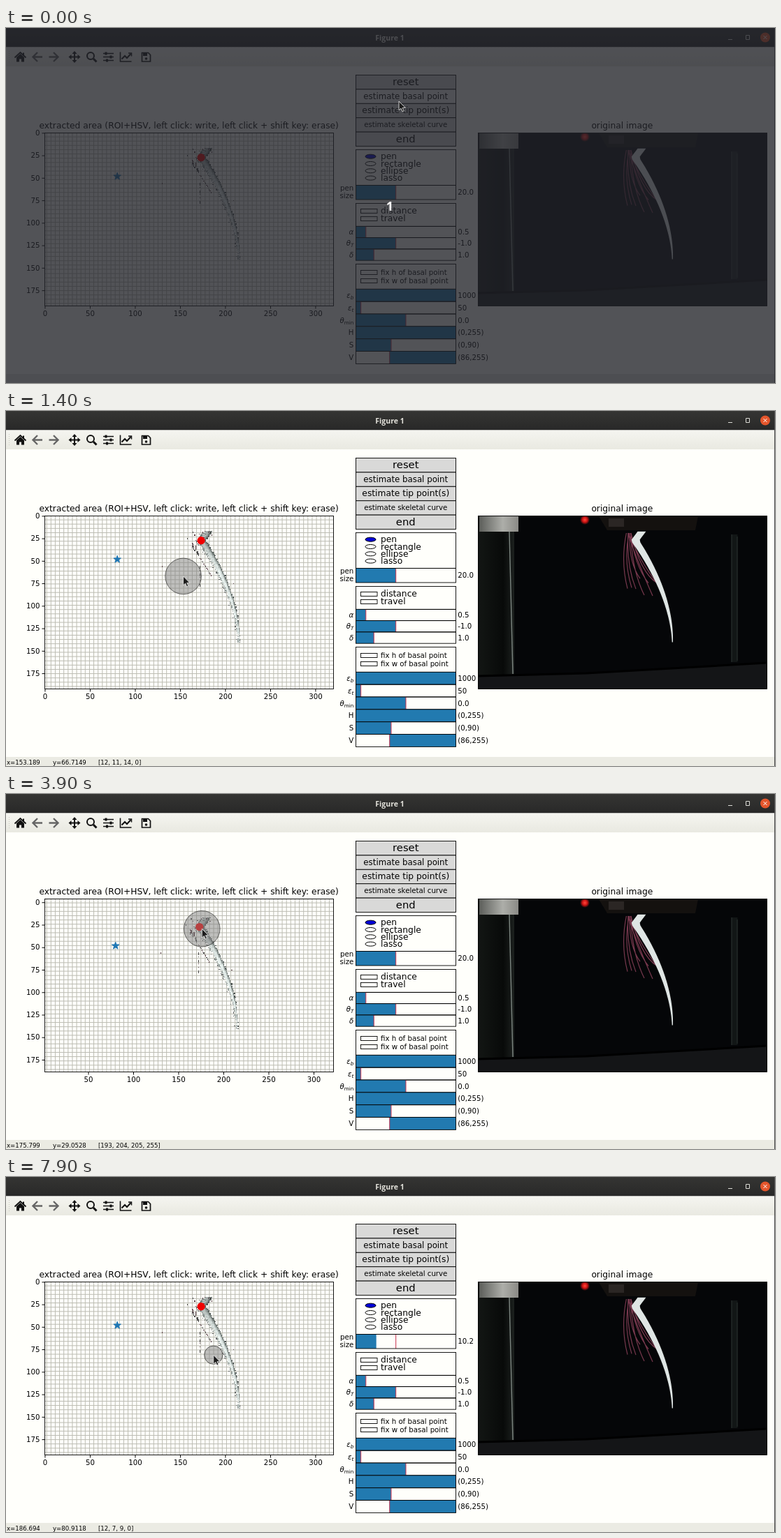
Recreate the animation shown at these times as an HTML page. Size 1100 by 509 pixels, loop 8 s.

```html
<!DOCTYPE html>
<html lang="en">
<head>
<meta charset="utf-8">
<title>Figure 1</title>
<style>
  html, body { margin: 0; width: 100%; height: 100%; overflow: hidden; background: #fffffb; }
  svg { display: block; width: 100%; height: 100%; }
  text { font-family: "DejaVu Sans", sans-serif; font-size: 10.2px; white-space: pre; }
  .big { font-size: 14.8px; }
  .mid { font-size: 12.25px; }
  .snug { font-size: 11.8px; }
  .status { font-size: 8.6px; }
  .bold { font-family: "Open Sans", sans-serif; font-weight: 700; }
  .caption { font-size: 10.5px; fill: #e2e1da; }
  .count { font-size: 18px; fill: #fff; }
  .math { font-style: italic; }
  .sub { font-size: 7.2px; }
  .box { fill: none; stroke: #000; stroke-width: .9; }
  .cells { shape-rendering: crispEdges; }
</style>
</head>
<body>
<svg viewBox="0 0 1100 509">
  <defs>
    <linearGradient id="bar" x2="0" y2="1"><stop stop-color="#353533"/><stop offset="1" stop-color="#282828"/></linearGradient>
    <linearGradient id="tools" x2="0" y2="1"><stop stop-color="#f5f5f0"/><stop offset="1" stop-color="#e9e9e1"/></linearGradient>
    <linearGradient id="pillar"><stop stop-color="#131614"/><stop offset=".7" stop-color="#080a09"/><stop offset="1" stop-color="#1c201e"/></linearGradient>
    <linearGradient id="lamp"><stop stop-color="#5c5e5a"/><stop offset=".6" stop-color="#adaea9"/><stop offset="1" stop-color="#8b8a86"/></linearGradient>
    <radialGradient id="glow"><stop stop-color="#ff4a3c"/><stop offset=".5" stop-color="#d01414"/><stop offset="1" stop-color="#d01414" stop-opacity="0"/></radialGradient>
    <clipPath id="plotClip"><rect x="55.5" y="150.5" width="413" height="248"/></clipPath>
    <clipPath id="photoClip"><rect x="675.5" y="150.5" width="413" height="248"/></clipPath>
  </defs>

  <rect width="1100" height="509" fill="#fffffb"/>
  <rect width="1100" height="27.5" fill="url(#bar)"/>
  <text class="bold caption" x="549" y="17.8" text-anchor="middle">Figure 1</text>
  <path d="M1033 16.5h6M1058.5 10.5h5v6h-5z" fill="none" stroke="#dcdcd6"/>
  <circle cx="1086" cy="13.5" r="7" fill="#e5562c"/>
  <path d="M1083.5 11l5 5m0-5l-5 5" stroke="#fff"/>

  <rect y="27.5" width="1100" height="27.5" fill="url(#tools)"/>
  <path d="M4.5 33v18" stroke="#c9c9c0" stroke-dasharray="1 2"/>
  <g fill="none" stroke="#111" stroke-width="2">
    <path d="M12.5 42.5L20.5 35l8 7.5" stroke-width="1.8"/>
    <path d="M15 42l5.500-5 5.500 5v6.500h-4v-4h-3v4h-4zM24 35.500h2v4h-2z" fill="#111" stroke="none"/>
    <path d="M52 41.5H39M45 35l-6.500 6.500 6.500 6.500M61.500 41.5h13M68 35l6.500 6.500-6.500 6.500" stroke="#666" stroke-width="2.4"/>
    <path d="M98 35v13M91.5 41.5h13"/>
    <path d="M98 33l3.500 4h-7zM98 50l3.500-4h-7zM89.500 41.500l4-3.500v7zM106.500 41.500l-4-3.500v7z" fill="#111" stroke="none"/>
    <circle cx="121" cy="40" r="5"/><path d="M125 44l4.500 4.500" stroke-width="3"/>
    <path d="M139 36.5h15M139 41.5h15M139 46.5h15" stroke-width="1.5"/>
    <path d="M143 34.5v4M150 39.5v4M144.5 44.5v4" stroke-width="3"/>
    <path d="M163.5 34.5v13.500h16" stroke-width="1.6"/><path d="M165.5 44.5l4.500-4.500 3 3 5.500-6"/>
    <path d="M175 36h4.500v4.500" stroke-width="1.5"/>
    <path d="M194.5 35.5h9l3 3v9.500h-12z" stroke-width="1.7"/>
    <path d="M196 36h6v4h-6z" fill="#111" stroke="none"/><circle cx="200.5" cy="44" r="1.8" fill="#111" stroke="none"/>
  </g>

  <text class="mid" x="261.7" y="143.8" text-anchor="middle">extracted area (ROI+HSV, left click: write, left click + shift key: erase)</text>
  <text class="mid" x="881.3" y="143.8" text-anchor="middle">original image</text>

  <g clip-path="url(#plotClip)">
    <path id="hatch" stroke="#bcbcb3" fill="none"/>
    <g id="cells" class="cells"></g>
    <path id="star" fill="#1f77b4" stroke="#1f77b4"/>
    <circle id="basal" r="5.6" fill="#f00000"/>
    <circle id="pen" fill="#808080" fill-opacity=".5" stroke="#000" stroke-opacity=".55"/>
  </g>
  <g id="ticks"></g>
  <rect class="box" x="55.5" y="150.5" width="413" height="248"/>

  <g clip-path="url(#photoClip)">
    <rect x="675" y="150" width="415" height="249" fill="#050608"/>
    <rect x="675" y="172" width="52" height="208" fill="url(#pillar)"/>
    <rect x="677" y="151" width="56" height="22" fill="url(#lamp)"/>
    <path d="M720 173l5 204" stroke="#7d8681" stroke-width="1.4"/>
    <path d="M848 151h142l-4 20H860z" fill="#14110f"/>
    <path d="M862 154h22v12h-22z" fill="#2b2624"/>
    <circle cx="828" cy="156" r="7" fill="url(#glow)"/>
    <path d="M1042 177v183" stroke="#121616" stroke-width="9"/>
    <path d="M1038 177v183M1046 180v178" stroke="#2b3231"/>
    <path d="M675 381l155-5 260-15v40H675z" fill="#141517"/>
    <path d="M675 380l155-4 260-15" stroke="#000" stroke-width="3" fill="none"/>
    <path id="roots" fill="none" stroke="#77384d" stroke-width="1.2"/>
    <path id="stem" fill="#dfe5e4"/>
  </g>
  <rect class="box" x="675.5" y="150.5" width="413" height="248"/>

  <g id="panel"></g>
  <rect y="496" width="1100" height="13" fill="#ebebe3"/>
  <text class="status" id="sx" x="1" y="507.3"></text>
  <text class="status" id="sy" x="67" y="507.3"></text>
  <text class="status" id="sc" x="132" y="507.3"></text>
  <path d="M1099.5 0v509" stroke="#4b4b4b"/>

  <g id="veil">
    <rect width="1100" height="509" fill="#22232a" fill-opacity=".78"/>
    <text class="bold count" x="549" y="262" text-anchor="middle">1</text>
  </g>
  <path id="cursor" d="M0 0V13L3 10.3 5 14.8 7.2 13.8 5.2 9.5H9.3Z" fill="#1c1c1c" stroke="#f4f4f4" stroke-width=".8"/>
</svg>

<script>
const LOOP = 8000, STEP = 100;
const X0 = 55.3, Y0 = 150.2, UNIT = 1.29, COLS = 320, ROWS = 192;
const $ = id => document.getElementById(id);
const lerp = (a, b, u) => a + (b - a) * u;
const set = (id, attrs) => Object.entries(attrs).forEach(([k, v]) => $(id).setAttribute(k, v));

let seed = 7;
const rand = () => (seed = (seed * 16807) % 2147483647) / 2147483647;

// Left and right edge of the stem in an image row: a short hook, then a long bend
const HEAD = 17, KNEE = 27, TIP = 140;
function stemEdges(y) {
  const u = Math.max(0, (y - KNEE) / (TIP - KNEE));
  const mid = y < KNEE ? 173.5 + (KNEE - y) * .75 : 173.5 + 41.5 * (1 - (1 - u) ** 1.85);
  const half = 4.6 - 4.1 * u;
  return [mid - half, mid + half];
}

function drawCells() {
  let out = '';
  const cell = (x, y, fill, h = 1) =>
    out += `<rect x="${Math.floor(x) - .5}" y="${Math.floor(y) - .5}" width="1" height="${h}" fill="${fill}"/>`;
  const root = (x, y, h) => cell(x, y, rand() < .6 ? '#553a41' : '#4a4a4a', h);

  for (let y = HEAD; y <= TIP; y++) {
    const [l, r] = stemEdges(y);
    const base = 172 + Math.min(1, (y - HEAD) / 45) * 62;
    for (let x = Math.floor(l); x <= r; x++) {
      const t = (x - l) / (r - l);
      if (t < .12 && rand() < .4) continue;
      const shade = t < .12 ? .7 : 1 - .6 * Math.max(0, (t - .5) / .5) ** 1.4;
      const b = base * shade + rand() * 20 - 10;
      cell(x, y, `rgb(${b - 5},${b + 4},${b + 1})`);
    }
    if (rand() < .22) cell(r + 1, y, '#4c5251');
    if (rand() < .25) cell(l - 1 - rand(), y, '#606364');
  }
  for (let i = 0; i < 14; i++) root(164 + rand() * 22, HEAD + rand() * 8, 1);
  for (let i = 0; i < 10; i++) root(163 + i * .8, 28 + rand() * 8 + i, 1 + rand() * 4 | 0);
  for (let i = 0; i < 13; i++) root(172 + i, 47 + i * 1.6, 1);
  for (let y = 56; y < 78; y += 4) root(172, y, 1 + rand() * 3 | 0);
  [[130, 56], [158, 25], [209, 75]].forEach(([x, y]) => root(x, y, 1));
  $('cells').innerHTML = out;
}

function drawHatch() {
  const gap = 6.125;
  let d = '';
  for (let x = gap / 2; x < 469; x += gap) d += `M${x} 150V399`;
  for (let y = 55 + gap / 2; y < 399; y += gap) d += `M55 ${y}H469`;
  set('hatch', { d });
}

function drawPhoto() {
  const left = [], right = [];
  for (let y = HEAD; y <= TIP; y += 3) {
    const [l, r] = stemEdges(y).map(x => `${675.3 + (x + .5) * UNIT} ${Y0 + (y + .5) * UNIT}`);
    left.push(l);
    right.unshift(r);
  }
  set('stem', { d: 'M' + left.concat(right).join('L') + 'Z' });
  let d = '';
  for (let i = 0; i < 9; i++)
    d += `M${887 + rand() * 7} 175Q${879 + i * 4} ${215 + rand() * 16} ${889 + i * 6} ${240 + rand() * 34}`;
  set('roots', { d });
}

function drawStar() {
  const points = Array.from({ length: 10 }, (_, i) => {
    const a = i * Math.PI / 5, r = i % 2 ? 2.2 : 5.5;
    return `${r * Math.sin(a)} ${-r * Math.cos(a)}`;
  });
  set('star', { d: 'M' + points.join('L') + 'Z' });
}

const BUTTON_TOP = 67.5, BUTTON_H = 20.4;
function drawPanel() {
  let out = '';
  const left = 500.5, width = 143;
  const box = (y, h, extra = '') =>
    out += `<rect class="box" x="${left}" y="${y}" width="${width}" height="${h}" ${extra}/>`;
  const text = (s, x, y, cls = '', anchor = 'start', id = '') =>
    out += `<text id="${id}" class="${cls}" x="${x}" y="${y}" text-anchor="${anchor}">${s}</text>`;
  const sub = (s, slant = 'italic') => `<tspan class="sub" dy="2" font-style="${slant}">${s}</tspan>`;

  const buttons = [['reset', 'big'], ['estimate basal point', 'snug'], ['estimate tip point(s)', 'mid'],
    ['estimate skeletal curve', ''], ['end', 'big']];
  buttons.forEach(([s, cls], i) => {
    const y = BUTTON_TOP + i * BUTTON_H;
    box(y, BUTTON_H, `id="b${i}"`);
    text(s, 571.8, y + BUTTON_H / 2 + (cls === 'big' ? 4.4 : 3.4), cls, 'middle');
  });

  box(174.5, 51);
  ['pen', 'rectangle', 'ellipse', 'lasso'].forEach((s, i) => {
    const y = 184.2 + i * 10.3;
    out += `<ellipse cx="521.5" cy="${y}" rx="7.5" ry="3" fill="${i ? 'none' : '#0000d8'}" stroke="#000"/>`;
    text(s, 536, y + 4, 'mid');
  });

  const checks = (y, h, labels, cls) => {
    box(y, h);
    labels.forEach((s, i) => {
      const cy = y + h / 3 + i * h / 3;
      out += `<rect class="box" x="507.5" y="${Math.round(cy) - 3.5}" width="23.5" height="6"/>`;
      text(s, 536, cy + 3.4, cls);
    });
  };
  checks(251.5, 33, ['distance', 'travel'], 'mid');
  checks(338.5, 36, ['fix h of basal point', 'fix w of basal point'], '');

  const sliders = (top, h, rows) => rows.forEach(([label, value, to, from = 0, id = ''], i) => {
    const y = top + i * h, base = y + h / 2 + 3.6;
    const mark = left + width * (from || to);
    out += `<rect id="${id}Fill" x="${left + width * from}" y="${y}" width="${width * (to - from)}" height="${h}" fill="#227ab0"/>
      <path d="M${mark} ${y}v${h}" stroke="#c8304c"/>`;
    box(y, h);
    text(label, 497.3, base, /[^A-Z]/.test(label) ? 'math' : '', 'end');
    text(value, 646.3, base, '', 'start', id + 'Text');
  });
  text('pen', 497.3, 232.7, '', 'end');
  text('size', 497.3, 244.2, '', 'end');
  sliders(225.5, 20.5, [['', '20.0', .4, 0, 'size']]);
  sliders(284.3, 16.3, [['α', '0.5', .1], ['θ' + sub('T'), '-1.0', .4], ['δ', '1.0', .18]]);
  sliders(374.3, 17.85, [['ε' + sub('b'), '1000', 1], ['ε' + sub('t'), '50', .05],
    ['θ' + sub('min', 'normal'), '0.0', .5], ['H', '(0,255)', 1],
    ['S', '(0,90)', 90 / 255], ['V', '(86,255)', 1, 86 / 255]]);
  $('panel').innerHTML = out;
}

// Scroll wheel notches; each one zooms by a factor of 1.5
const zoomIn = [1900, 2200, 2400, 3900], zoomOut = [2900, 3200, 3300, 3500];
const HOME = 5000, RESIZE = 7000;
function viewAt(t) {
  const passed = list => list.filter(s => s <= t).length;
  const z = 1.5 ** (passed(zoomIn) - passed(zoomOut));
  const drifted = t >= zoomOut[0] && t < HOME;
  const [fx, fy, left, top] = drifted ? [175.8, 29.05, 1.4, -4.3] : [176.3, 28.8, -.5, -.5];
  return { left: fx - (fx - left) / z, top: fy - (fy - top) / z, scale: UNIT * z };
}
const toX = (v, x) => X0 + (x - v.left) * v.scale;
const toY = (v, y) => Y0 + (y - v.top) * v.scale;
const onImage = (t, x, y) => [toX(viewAt(t), x), toY(viewAt(t), y)];

// Pointer moves: start, end, place reached
const moves = [
  [200, 900, 294, 201],
  [900, 1400, ...onImage(1400, 153.189, 66.7149)],
  [1500, 1600, ...onImage(1600, 176.3, 28.8)],
  [2100, 2600, ...onImage(2600, 176.472, 27.2581)],
  [2800, 2900, ...onImage(3900, 175.799, 29.0528)],
  [4100, 4600, 275, 222],
  [5000, 5550, 548, 242],
  [5800, 6000, 574, 247],
  [6000, 6200, 533, 242],
  [6300, 6600, 537, 235],
  [6900, 7000, 530, 235],
  [7200, 7900, ...onImage(7900, 186.694, 80.9118)]
];
function pointerAt(t) {
  let x = 562, y = 105;
  for (const [from, to, nx, ny] of moves) {
    const u = Math.min(1, Math.max(0, (t - from) / (to - from)));
    x = lerp(x, nx, u);
    y = lerp(y, ny, u);
  }
  return [x, y];
}

const inPlot = ([x, y]) => x > 55 && x < 468 && y > 150 && y < 398;
const penSize = t => t < RESIZE ? 20 : 10.2;
function pixelAt(t) {
  if (t < 1600) return '12, 11, 14, 0';
  if (t >= RESIZE) return '12, 7, 9, 0';
  if (t > 4200) return '12, 11, 14, 0';
  return t >= zoomIn[1] && t < zoomOut[0] ? '163, 165, 165, 255' : '193, 204, 205, 255';
}

function niceTicks(from, span) {
  const step = [5, 10, 20, 25, 50, 100].find(s => span / s <= 9);
  const list = [];
  for (let v = Math.ceil(from / step) * step; v <= from + span; v += step) list.push(v);
  return list;
}

function drawView(v) {
  let out = '', d = '';
  for (const x of niceTicks(v.left, COLS * UNIT / v.scale)) {
    d += `M${toX(v, x)} 398.5v4`;
    out += `<text x="${toX(v, x)}" y="413.2" text-anchor="middle">${x}</text>`;
  }
  for (const y of niceTicks(v.top, ROWS * UNIT / v.scale)) {
    d += `M55.5 ${toY(v, y)}h-4`;
    out += `<text x="48.4" y="${toY(v, y) + 3.2}" text-anchor="end">${y}</text>`;
  }
  $('ticks').innerHTML = `<path d="${d}" stroke="#000"/>` + out;
  set('cells', { transform: `translate(${toX(v, 0)} ${toY(v, 0)}) scale(${v.scale})` });
  set('star', { transform: `translate(${toX(v, 80)} ${toY(v, 48)})` });
  set('basal', { transform: `translate(${toX(v, 173)} ${toY(v, 27)})` });
}

function render(t) {
  const v = viewAt(t), [x, y] = pointerAt(t);
  drawView(v);

  // The pen ring stays where the pointer last left the plot
  let seen = t;
  while (seen >= 0 && !inPlot(pointerAt(seen))) seen -= STEP;
  const [cx, cy] = pointerAt(seen);
  set('pen', { cx, cy, r: seen < 0 ? 0 : penSize(seen) * v.scale });

  const on = inPlot([x, y]);
  $('sx').textContent = on ? 'x=' + (v.left + (x - X0) / v.scale).toPrecision(6) : '';
  $('sy').textContent = on ? 'y=' + (v.top + (y - Y0) / v.scale).toPrecision(6) : '';
  $('sc').textContent = on ? `[${pixelAt(t)}]` : '';

  const hovered = x > 500 && x < 644 ? Math.floor((y - BUTTON_TOP) / BUTTON_H) : -1;
  for (let i = 0; i < 5; i++) $('b' + i).style.fill = i === hovered ? '#f2f2f1' : '#d9d9d8';
  set('sizeFill', { width: penSize(t) * 2.86 });
  $('sizeText').textContent = penSize(t).toFixed(1);
  set('cursor', { transform: `translate(${x} ${y})` });
  $('veil').style.display = t < STEP ? '' : 'none';
}

drawCells();
drawHatch();
drawPhoto();
drawStar();
drawPanel();

const start = performance.now();
let shown = -1;
function tick() {
  const t = Math.floor((performance.now() - start) % LOOP / STEP) * STEP;
  if (t !== shown) render(shown = t);
  requestAnimationFrame(tick);
}
tick();
</script>
</body>
</html>
```
